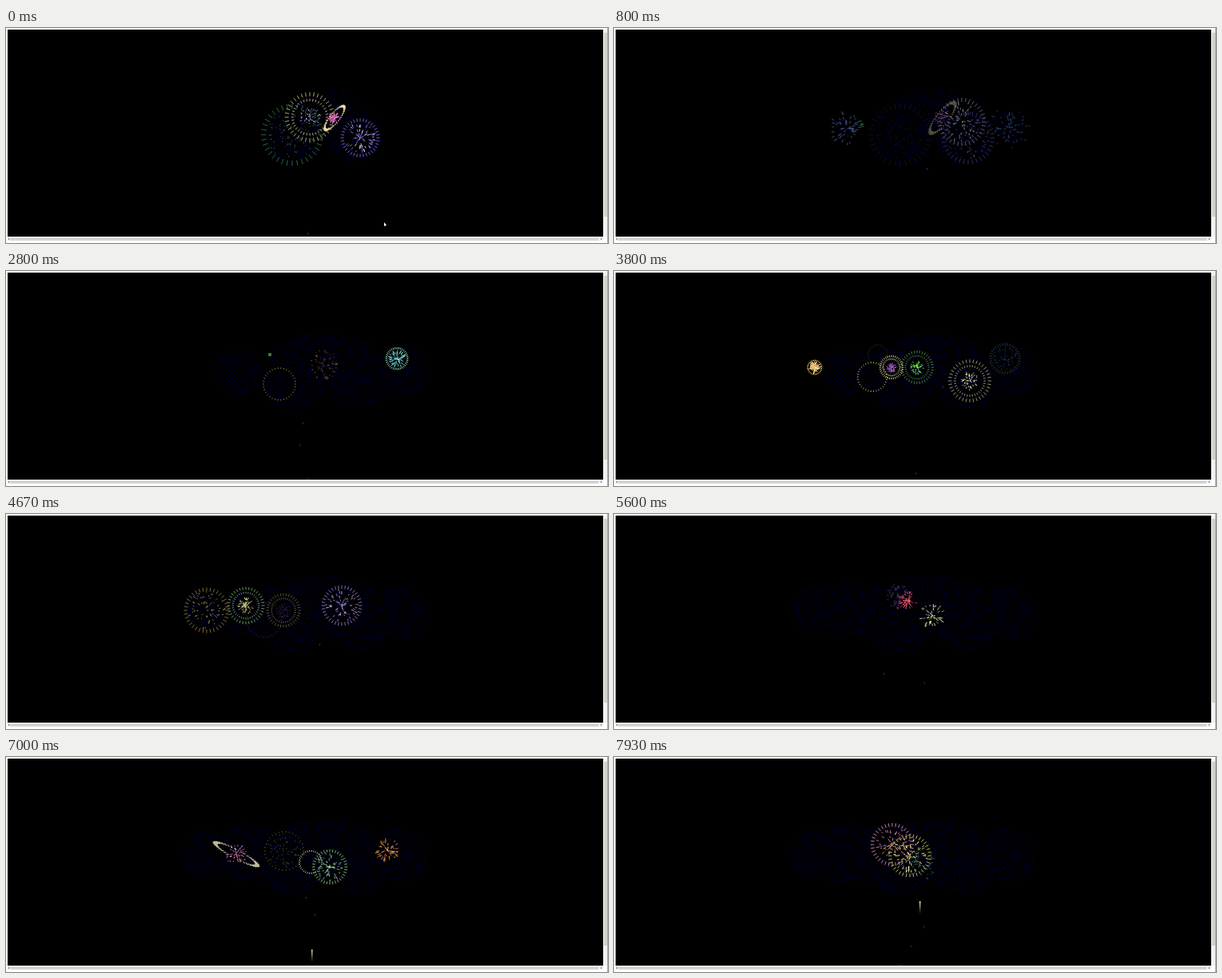
Write an HTML page with a canvas that moves like this. It is 753 by 270 pixels and loops after 8000 ms.

```html
<!DOCTYPE html>
<html lang="en">
<head>
<meta charset="utf-8">
<title>Fireworks</title>
<style>
html, body { margin: 0; width: 100%; height: 100%; overflow: hidden; background: #fff; }
canvas { display: block; }
</style>
</head>
<body>
<canvas id="stage" width="753" height="270"></canvas>
<script>
const ctx = document.getElementById('stage').getContext('2d');
const LOOP = 8, FPS = 15, TAU = Math.PI * 2;
const bursts = [], rockets = [];

function random(seed) {
  return () => {
    seed = (seed * 1664525 + 1013904223) >>> 0;
    return seed / 4294967296;
  };
}

function burst(kind, start, x, y, radius, colors, opt = {}) {
  bursts.push({ kind, start, x, y, radius, colors, life: 1.6, squash: 1, angle: 0, ...opt });
}

function rocket(start, x0, x1, y1, opt = {}) {
  rockets.push({ start, x0, x1, y1, time: 1.28, color: '#56505c', tail: 3, ...opt });
}

// Already in the sky when the loop begins
burst('ball', -3, 412, 112, 34, ['#7a83c8', '#c8c890']);
burst('ball', -2.6, 436, 134, 36, ['#7a83c8', '#c8c890']);
burst('ball', -1.25, 358, 134, 40, ['#3c9c48', '#4868c0', '#4c8a5a'], { life: 2.2 });
burst('crown', -0.8, 380, 112, 34, ['#e8e08c', '#a9aaf4', '#e0e0ff']);
burst('disk', -0.45, 411, 113, 27, ['#fff0b8', '#d456b4', '#ff90d8'], { squash: 0.32, angle: -0.9 });
burst('ball', -0.4, 443, 138, 34, ['#6c64d0', '#8a7ce0', '#d8c8d8']);

burst('ball', 0.1, 435, 118, 34, ['#7a83c8', '#c8c890'], { life: 1.2 });
burst('dots', 0.2, 495, 125, 32, ['#2c5a70', '#2c3a90'], { life: 1.45 });
burst('dots', 0.35, 291, 126, 30, ['#2f6a48', '#4c4ca8'], { life: 1.45 });
burst('ball', 1.15, 398, 132, 22, ['#e0a848', '#e8b860', '#fff0c0']);
burst('dots', 1.9, 397, 118, 21, ['#b05c40', '#8c5060', '#b09050'], { life: 1.3 });
burst('ring', 2.2, 342, 142, 24.5, ['#a6a840'], { life: 1.1 });
burst('ball', 2.4, 489, 110, 20, ['#a0e8c8', '#3c9cc0', '#50c0a0']);
burst('ring', 2.75, 330, 105, 13.5, ['#4a7a38'], { life: 1.25 });

burst('ring', 3.25, 323, 133, 23, ['#b4c274']);
burst('crown', 3.27, 445, 138, 33, ['#a4b078', '#f4f0c4', '#d8d8a0'], { life: 1.4 });
burst('crown', 3.28, 379, 121, 26, ['#4f9448', '#64e848', '#90f870'], { life: 1.4 });
burst('crown', 3.43, 347, 121, 22, ['#d8cc88', '#b45cc8', '#8850b0']);
burst('ball', 3.68, 251, 121, 30, ['#e0b060', '#e8c878', '#fff0b0'], { life: 1.5 });
burst('ball', 4.08, 420, 115, 30, ['#a080d8', '#e0c0d8'], { life: 1.4 });
burst('crown', 4.25, 300, 115, 32, ['#70a860', '#d8d890'], { life: 1.3 });

burst('dots', 4.75, 355, 103, 18, ['#a8508c', '#6650a8'], { life: 1.3 });
burst('dots', 5, 398, 128, 20, ['#d8e49c', '#80a860', '#fff4c8']);
burst('dots', 5.2, 367, 109, 18, ['#d83838', '#e86870', '#c03050']);
burst('ring', 5.93, 348, 118, 26, ['#709458'], { life: 1.6 });
burst('dots', 5.95, 348, 118, 24, ['#709458', '#5864b0', '#a08c50'], { life: 1.5 });
burst('disk', 6.3, 288, 122, 37, ['#f8f0c0', '#d864b8', '#f088c8'], { squash: 0.18, angle: 0.49, life: 1.5 });
burst('ball', 6.4, 405, 138, 26, ['#88d080', '#70b0c8', '#d0e8a8'], { life: 1.45 });
burst('ring', 6.57, 381, 132, 20, ['#d0ecb4'], { life: 1.3 });
burst('dots', 6.6, 477, 117, 22, ['#e88838', '#f0b850', '#d06c48'], { life: 1.25 });
burst('dots', 7.1, 382, 135, 24, ['#50904c', '#488c90'], { life: 1.3 });
burst('ball', 7.33, 348, 110, 33, ['#d88cc0', '#e8c064', '#c87898']);
burst('ball', 7.33, 370, 124, 33, ['#d0c460', '#f4e88c', '#fff4c0']);

rocket(-0.045, 376, 398, 132);
rocket(1.1, 366, 342, 142);
rocket(2.15, 363, 379, 121);
rocket(2.4, 376, 347, 121);
rocket(2.78, 376, 420, 115);
rocket(3.72, 376, 398, 128);
rocket(5.03, 376, 288, 122);
rocket(5.08, 376, 405, 138);
rocket(6.2, 382, 370, 124);
rocket(6.35, 391, 382, 135);
rocket(6.71, 382, 382, 115, { time: 2.1, color: '#f4eca8', tail: 16 });
rocket(7.42, 384, 393, 120);
rocket(7.64, 376, 348, 120);
rocket(7.86, 358, 350, 120);

// Dark specks left behind by faded sparks
function speckPattern() {
  const size = 96, tile = document.createElement('canvas'), rnd = random(17);
  tile.width = tile.height = size;
  const g = tile.getContext('2d');
  g.fillStyle = '#000055';
  for (let y = 0; y < size; y += 2)
    for (let x = 0; x < size; x += 6)
      if (rnd() < 0.85) g.fillRect((x + y * 2 + Math.floor(rnd() * 3)) % size, y + Math.floor(rnd() * 2), 1, 1);
  return ctx.createPattern(tile, 'repeat');
}
const specks = speckPattern();

const spread = age => 1 - Math.exp(-3.2 * age);

function drawResidue(t) {
  ctx.beginPath();
  for (const b of bursts) {
    const age = t - b.start;
    if (age < 0.3) continue;
    const r = b.radius * spread(age - 0.3);
    ctx.moveTo(b.x + r, b.y);
    ctx.arc(b.x, b.y, r, 0, TAU);
  }
  ctx.fillStyle = specks;
  ctx.fill();
}

function spokes(r, count, length, color, squash = 1) {
  ctx.strokeStyle = color;
  ctx.beginPath();
  for (let i = 0; i < count; i++) {
    const a = i / count * TAU, c = Math.cos(a), s = Math.sin(a) * squash;
    const inner = Math.max(0, r - length);
    ctx.moveTo(c * inner, s * inner);
    ctx.lineTo(c * r, s * r);
  }
  ctx.stroke();
}

// Radial streaks at random places inside a disc
function streaks(r, count, length, colors, seed) {
  const rnd = random(seed);
  for (let i = 0; i < count; i++) {
    const a = rnd() * TAU, d = rnd() ** 0.6 * r, hue = Math.floor(rnd() * colors.length);
    const inner = Math.max(0, d - length * (0.6 + 0.8 * rnd()));
    ctx.strokeStyle = colors[hue];
    ctx.beginPath();
    ctx.moveTo(Math.cos(a) * inner, Math.sin(a) * inner);
    ctx.lineTo(Math.cos(a) * d, Math.sin(a) * d);
    ctx.stroke();
  }
}

function drawBurst(b, t) {
  const age = t - b.start;
  if (age < 0 || age > b.life) return;
  const r = b.radius * spread(age), main = b.colors[0], inside = b.colors.slice(1);
  const seed = Math.round(b.x * 97 + b.y), length = Math.max(1.6, 4.5 - age * 2.6);
  ctx.save();
  ctx.translate(b.x, b.y);
  ctx.globalAlpha = 1 - (age / b.life) ** 2;
  if (b.kind === 'ball') {
    spokes(r, 36, r * 0.17, main);
    streaks(r * 0.85, 70, length, b.colors, seed);
  }
  if (b.kind === 'ring') spokes(r, 34, 1.8, main);
  if (b.kind === 'dots') streaks(r, 62, length, b.colors, seed);
  if (b.kind === 'crown') {
    spokes(r, 36, r * 0.16, main);
    spokes(r * 0.74, 36, r * 0.1, main);
    streaks(r * 0.45, 54, length * 0.7, inside, seed);
  }
  if (b.kind === 'disk') {
    streaks(r * 0.42, 54, length, inside, seed);
    ctx.rotate(b.angle);
    spokes(r, 40, r * 0.2, main, b.squash);
  }
  ctx.restore();
}

function drawRocket(k, t) {
  const p = (t - k.start) / k.time;
  if (p < 0 || p > 1) return;
  const x = k.x0 + (k.x1 - k.x0) * p, y = 262 + (k.y1 - 262) * p;
  const trail = ctx.createLinearGradient(0, y, 0, y + k.tail);
  trail.addColorStop(0, k.color);
  trail.addColorStop(1, '#000');
  ctx.fillStyle = trail;
  ctx.fillRect(Math.round(x), y, k.tail > 5 ? 1.5 : 1, k.tail);
}

function rect(color, x, y, w, h) {
  ctx.fillStyle = color;
  ctx.fillRect(x, y, w, h);
}

function drawWindow() {
  rect('#fff', 0, 0, 753, 270);
  rect('#f0eff2', 2, 263, 745, 4);
  rect('#d8d4d2', 5, 263, 736, 4);
  rect('#777', 3, 264, 1, 2);
  rect('#777', 744, 264, 1, 2);
  rect('#f1f0ec', 748, 2, 4, 260);
  rect('#d4d0cc', 748, 6, 4, 231);
  rect('#aaa89c', 752, 0, 1, 270);
  rect('#000', 2, 2, 745, 260);
}

function drawCursor() {
  ctx.fillStyle = '#fff';
  ctx.beginPath();
  ctx.moveTo(473, 244);
  ctx.lineTo(473, 249);
  ctx.lineTo(476, 247.5);
  ctx.fill();
}

function draw(t) {
  drawWindow();
  ctx.save();
  ctx.beginPath();
  ctx.rect(2, 2, 745, 260);
  ctx.clip();
  drawResidue(t);
  rockets.forEach(k => drawRocket(k, t));
  bursts.forEach(b => drawBurst(b, t));
  if (t < 0.3) drawCursor();
  ctx.restore();
}

const origin = performance.now();
let last = -1;
function tick() {
  const seconds = (performance.now() - origin) / 1000 % LOOP;
  const step = Math.floor(seconds * FPS + 0.02) % (LOOP * FPS);
  if (step !== last) draw(step / FPS);
  last = step;
  requestAnimationFrame(tick);
}
tick();
</script>
</body>
</html>
```
